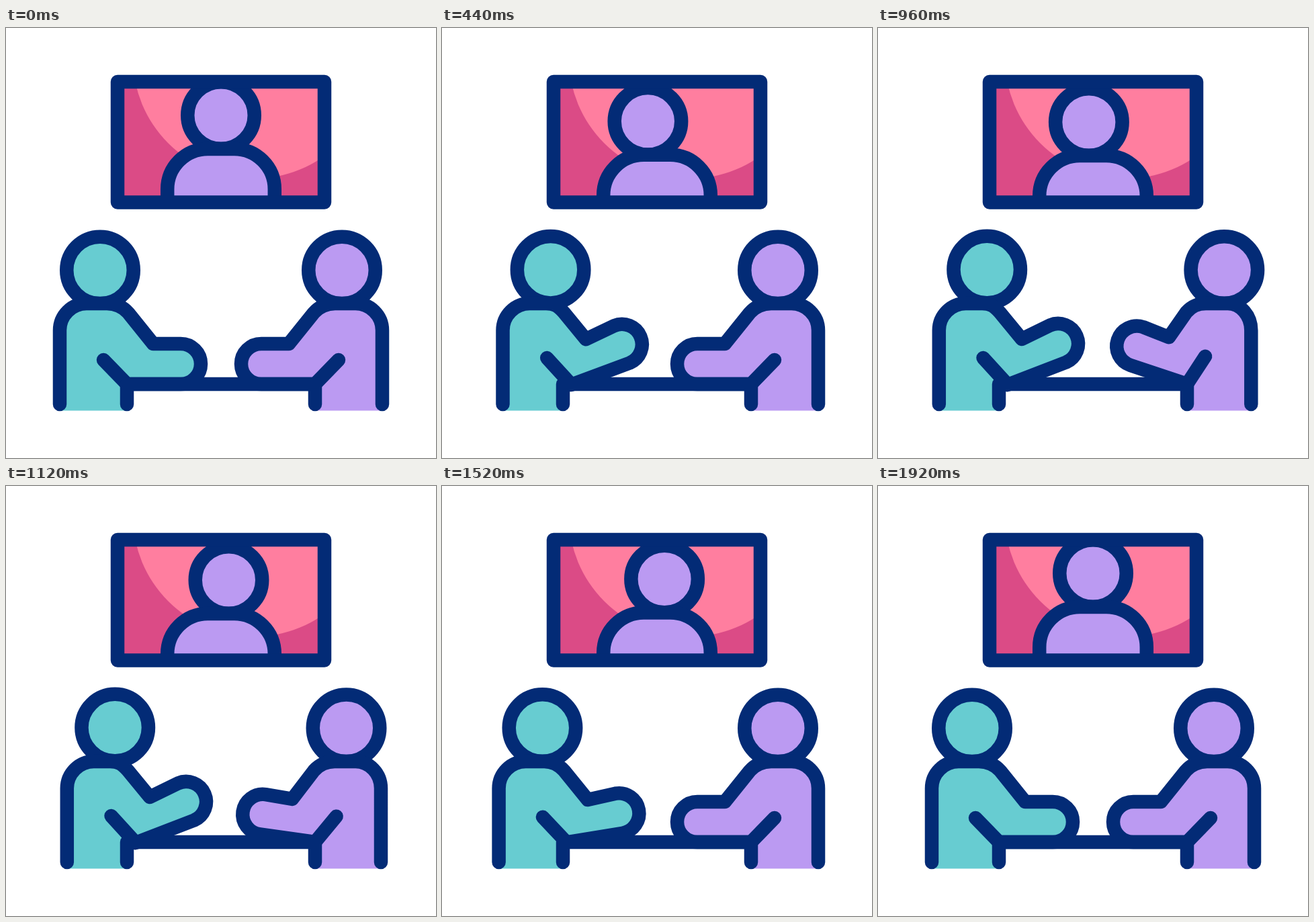
Animation, 640 px wide and 640 px high, one loop 2000 ms. Source, as an HTML page with a canvas:

```html
<!DOCTYPE html>
<html lang="en">
<head>
<meta charset="utf-8">
<title>Video meeting</title>
<style>
  html, body { margin: 0; height: 100%; overflow: hidden; background: #fff; }
  canvas { display: block; width: 100vw; height: 100vh; }
</style>
</head>
<body>
<canvas id="stage" width="640" height="640"></canvas>
<script>
const ctx = document.getElementById('stage').getContext('2d');
const LOOP = 2000, STEP = 40;
const NAVY = '#032b76', TEAL = '#67ccd1', PURPLE = '#bb9af2', PINK = '#ff7e9f', ROSE = '#db4b86';

// Poses face right; the right-hand person is mirrored.
const REST = { headX: 140, headY: 360.5, back: 80, round: 40, flat: 150, shoulderX: 182, shoulderY: 424,
  elbowX: 219, elbowY: 470, handX: 260, handY: 500, angle: 0, cornerX: 180, cornerY: 530, pitX: 145, pitY: 494 };
const LEFT_TALK = { headX: 162.2, headY: 359.6, back: 90.8, round: 40, flat: 155, shoulderX: 181.5, shoulderY: 423.5,
  elbowX: 214, elbowY: 463, handX: 268, handY: 470, angle: 23.5, cornerX: 193, cornerY: 531, pitX: 156.5, pitY: 491 };
const RIGHT_TALK = { headX: 122.6, headY: 360, back: 85.3, round: 34, flat: 152, shoulderX: 181, shoulderY: 423,
  elbowX: 205.5, elbowY: 459, handX: 254, handY: 470, angle: 21, cornerX: 180, cornerY: 530, pitX: 154, pitY: 488 };

const lerp = (a, b, p) => a + (b - a) * p;

function ease(t, start, end) {
  const u = Math.min(1, Math.max(0, (t - start) / (end - start)));
  return u * u * (3 - 2 * u);
}

function blend(from, to, p) {
  const pose = {};
  for (const key in from) pose[key] = lerp(from[key], to[key], p);
  return pose;
}

function line(...points) {
  ctx.beginPath();
  for (let i = 0; i < points.length; i += 2) ctx.lineTo(points[i], points[i + 1]);
  ctx.stroke();
}

function head(x, y, color) {
  ctx.beginPath();
  ctx.arc(x, y, 49.75, 0, Math.PI * 2);
  ctx.fillStyle = color;
  ctx.fill();
  ctx.stroke();
}

function bodyPath(p, bottom) {
  const k = 0.448, a = p.angle * Math.PI / 180;
  ctx.beginPath();
  ctx.moveTo(p.back, bottom);
  ctx.lineTo(p.back, 450);
  ctx.bezierCurveTo(p.back, 410 + 40 * k, p.back + p.round * k, 410, p.back + p.round, 410);
  ctx.lineTo(p.flat, 410);
  ctx.bezierCurveTo(p.flat + 13, 410, p.shoulderX - 8, p.shoulderY - 9, p.shoulderX, p.shoulderY);
  ctx.lineTo(p.elbowX, p.elbowY);
  ctx.arc(p.handX, p.handY, 30, -Math.PI / 2 - a, Math.PI / 2 - a);
  ctx.lineTo(p.cornerX, p.cornerY);
}

function person(pose, color) {
  head(pose.headX, pose.headY, color);
  bodyPath(pose, 569.5);
  ctx.lineTo(180, 530);
  ctx.lineTo(180, 569.5);
  ctx.fill();
  bodyPath(pose, 560);
  ctx.lineTo(pose.pitX, pose.pitY);
  ctx.stroke();
}

function screen(x, drop) {
  ctx.fillStyle = ROSE;
  ctx.fillRect(166, 80, 308, 179.5);
  ctx.save();
  ctx.beginPath();
  ctx.rect(166, 80, 308, 179.5);
  ctx.clip();
  ctx.beginPath();
  ctx.arc(368.8, 44.3, 180, 0, Math.PI * 2);
  ctx.fillStyle = PINK;
  ctx.fill();
  head(x, 130 + drop, PURPLE);
  ctx.beginPath();
  ctx.moveTo(240.2, 270);
  ctx.arc(300.2, 240 + drop, 60, Math.PI, Math.PI * 1.5);
  ctx.arc(339.8, 240 + drop, 60, -Math.PI / 2, 0);
  ctx.lineTo(399.8, 270);
  ctx.fill();
  ctx.stroke();
  ctx.restore();
  ctx.strokeRect(166, 80, 308, 179.5);
}

function draw(t) {
  const left = ease(t, 80, 480) - ease(t, 1300, 1700);
  const right = ease(t, 515, 730) - ease(t, 867, 1300);
  const lean = ease(t, 120, 525), sway = ease(t, 833, 1167), settle = ease(t, 1400, 1900);

  ctx.fillStyle = '#fff';
  ctx.fillRect(0, 0, 640, 640);
  ctx.strokeStyle = NAVY;
  ctx.lineWidth = 20.5;
  ctx.lineCap = ctx.lineJoin = 'round';

  screen(320 - 15.3 * lean + 28.3 * sway - 13 * settle, 10 * (lean - settle));
  person(blend(REST, LEFT_TALK, left), TEAL);
  ctx.save();
  ctx.translate(640, 0);
  ctx.scale(-1, 1);
  person(blend(REST, RIGHT_TALK, right), PURPLE);
  ctx.restore();
  line(180, 560, 180, 530, 460, 530, 460, 560);
}

function frame() {
  const t = performance.now() % LOOP;
  draw(Math.floor(t / STEP) * STEP);
  requestAnimationFrame(frame);
}
frame();
</script>
</body>
</html>
```
